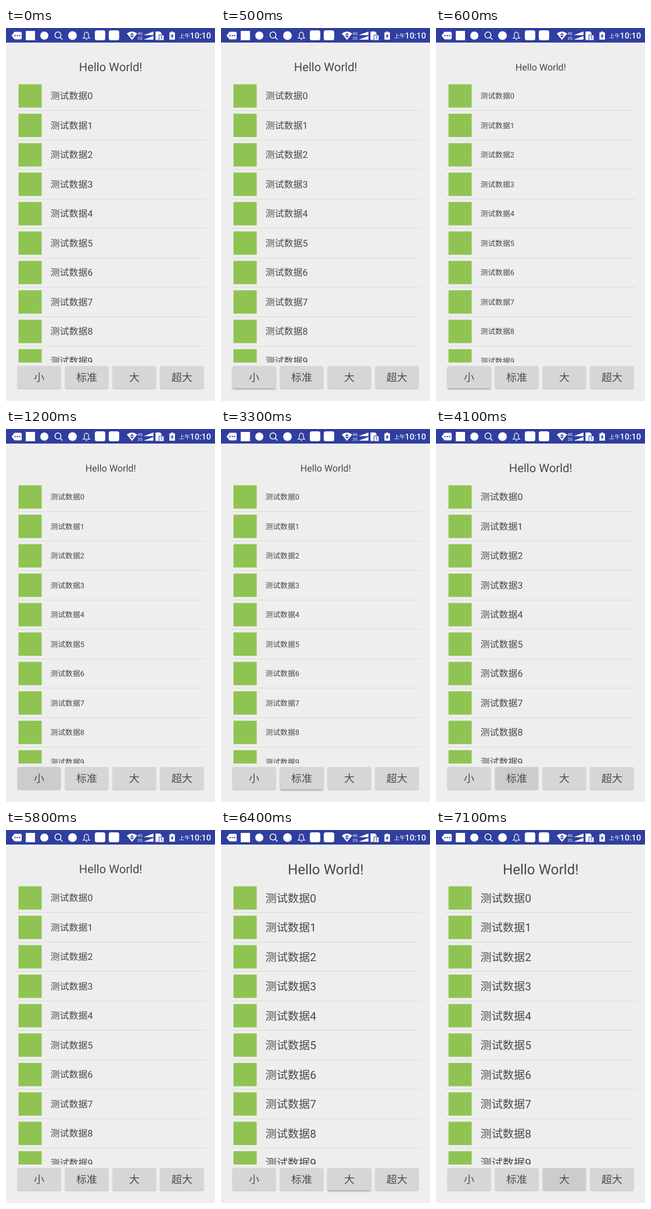
An HTML page for the animation above (8000 ms loop, 360 by 640 pixels).

```html
<!DOCTYPE html>
<html lang="zh">
<head>
<meta charset="utf-8">
<style>
  html, body { margin: 0; width: 100%; height: 100%; overflow: hidden; background: #eee; }
  svg { display: block; width: 360px; height: 640px; text-rendering: geometricPrecision; font-family: Roboto, "Noto Sans CJK SC", "Noto Sans CJK", sans-serif; }
  .btn text, #title { text-anchor: middle; }
</style>
</head>
<body>
<svg viewBox="0 0 360 640">
  <defs><clipPath id="listClip"><rect y="90" width="360" height="484"/></clipPath></defs>
  <rect width="360" height="640" fill="#eee"/>

  <g fill="#fff">
    <rect width="360" height="25" fill="#303f9f"/>
    <path d="M9.5 13 14 7.2q.6-.7 1.5-.7H25q2 0 2 2v9q0 2-2 2h-9.500q-.9 0-1.500-.7z"/>
    <g fill="#303f9f"><circle cx="15.500" cy="13" r="1.200"/><circle cx="19.500" cy="13" r="1.200"/><circle cx="23.500" cy="13" r="1.200"/></g>
    <rect x="34" y="5" width="16" height="16"/>
    <circle cx="66" cy="13" r="7"/>
    <g fill="none" stroke="#fff" stroke-width="1.500">
      <circle cx="89.500" cy="12" r="5.200"/><path d="m93.300 15.800 4 4"/>
    </g>
    <circle cx="114.500" cy="13" r="7.500"/>
    <path d="M133 17.500q2-1.500 2-4v-2.500q0-3.500 3.500-3.500t3.500 3.500v2.500q0 2.500 2 4zM138.500 7.500V6M137 19.700h3" fill="none" stroke="#fff" stroke-width="1.200"/>
    <rect x="153" y="4" width="18" height="17" rx="3.500"/>
    <rect x="177" y="4" width="18" height="17" rx="3.500"/>
    <path d="M208 9.500q9-7 18 0L217 20.500z"/>
    <path d="m213.700 11.800 3.300-3.300 3.300 3.300zM213.700 13.300h6.600l-3.300 3.500z" fill="#303f9f"/>
    <g font-size="7"><text x="226.500" y="11.800">4G</text><text x="226.500" y="19.800">2G</text></g>
    <path d="M237 12.300 254 6v6.300zM237 20l17-6.300V20z"/>
    <path d="M257.500 6h8l2.500 3v3h4v8.500h-14.500z"/>
    <rect x="263" y="11.500" width="9" height="9" fill="#303f9f"/>
    <rect x="264" y="12.500" width="7.500" height="8"/>
    <text x="265.700" y="19.300" font-size="7.500" font-weight="700" fill="#303f9f">1</text>
    <path d="M281.500 7.500h3V6h3.500v1.500h3v12.500h-9.500z"/>
    <path d="m287.500 9-4 5.500h2.300l-.8 4 4-5.500h-2.300z" fill="#303f9f"/>
    <text x="298" y="17.300" font-size="9.500">上午</text>
    <text x="316.800" y="18" font-size="14.300" font-weight="500">10:10</text>
  </g>

  <text id="title" x="180.300" fill="#484848">Hello World!</text>
  <g id="list" clip-path="url(#listClip)"></g>
  <g id="buttons"></g>
</svg>
<script>
const byId = id => document.getElementById(id);
const rowY = i => 116.6 + 50.5 * i;

byId('list').innerHTML = Array.from({ length: 10 }, (_, i) => `
  <rect x="21.500" y="${rowY(i) - 20}" width="40" height="40" fill="#8fc452"/>
  <text x="76.500" fill="#484848">测试数据${i}</text>
  <rect x="16" y="${Math.round(rowY(i) + 24.5)}" width="328" height="1" fill="#dcdcdc"/>`).join('');

byId('buttons').innerHTML = ['小', '标准', '大', '超大'].map((label, i) => `
  <g class="btn">
    <rect x="${20 + 82 * i}" y="580" width="74" height="38" rx="2"/>
    <text x="${57 + 82 * i}" y="606" font-size="18" fill="#4c4c4c">${label}</text>
  </g>`).join('');

const title = byId('title');
const rows = [...document.querySelectorAll('#list text')];
const faces = [...document.querySelectorAll('.btn rect')];

// Times in ms: press, text change, shadow fall (start, end), highlight end
const taps = [
  { scale: 0.8, press: 300, change: 600, fall: 800, rest: 950, end: 2600 },
  { scale: 1, press: 3150, change: 3500, fall: 3850, rest: 4100, end: 5800 },
  { scale: 1.2, press: 6050, change: 6400, fall: 6750, rest: 7100, end: 8000 }
];

const ramp = (t, a, b) => Math.min(1, Math.max(0, (t - a) / (b - a)));

function setText(el, size, y) {
  el.setAttribute('font-size', size);
  el.setAttribute('y', y + size * 0.36);
}

function draw(t) {
  const scale = taps.reduce((s, tap) => t >= tap.change ? tap.scale : s, 1);
  setText(title, 20.2 * scale, 67);
  rows.forEach((row, i) => setText(row, 16 * scale, rowY(i)));

  faces.forEach((face, i) => {
    const tap = taps[i];
    const lift = tap ? ramp(t, tap.press, tap.press + 150) - ramp(t, tap.fall, tap.rest) : 0;
    const dark = tap && t < tap.end ? ramp(t, tap.change, tap.change + 200) : 0;
    const grey = Math.round(214 - 10 * dark);
    face.style.fill = `rgb(${grey},${grey},${grey})`;
    face.style.filter = `drop-shadow(0 ${1 + lift}px ${1 + lift / 2}px rgba(0,0,0,${0.25 + 0.05 * lift}))`;
  });
}

const start = performance.now();
function tick() {
  draw((performance.now() - start) % 8000);
  requestAnimationFrame(tick);
}
tick();
</script>
</body>
</html>
```
